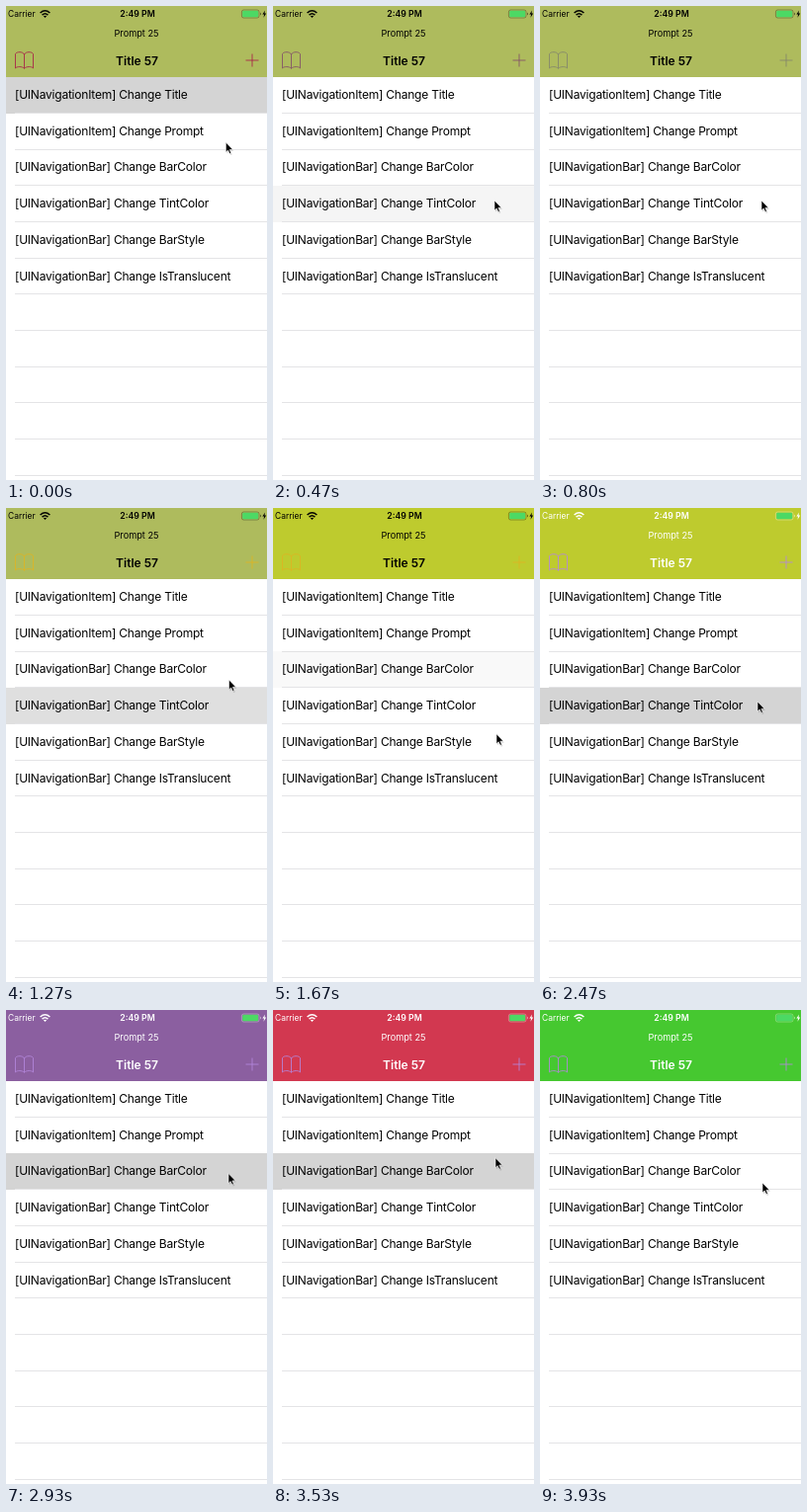
Write an HTML page that moves like this. It is 264x480 px and loops after 3.99 s.

```html
<!DOCTYPE html>
<html lang="en">
<head>
<meta charset="utf-8">
<title>Navigation bar demo</title>
<style>
  html, body { margin: 0; width: 100%; height: 100%; overflow: hidden; background: #fff; }
  svg { display: block; width: 264px; height: 480px; font-family: Inter, Roboto, sans-serif; }
  .row { font-size: 12px; letter-spacing: -.22px; }
  .mid { text-anchor: middle; }
  .bold { font-weight: 600; }
</style>
</head>
<body>
<svg viewBox="0 0 264 480">
  <g id="rows"></g>
  <rect id="bar" width="264" height="72"/>
  <g id="status" font-size="8.45">
    <text x="2" y="11">Carrier</text>
    <text class="mid bold" x="133" y="11" font-size="8.7">2:49 PM</text>
    <path d="M34.6 7Q39.5 2.6 44.4 7M36.6 9.1Q39.5 6.5 42.4 9.1" fill="none" stroke="currentColor" stroke-width="1.5"/>
    <path d="M37.9 10.3Q39.5 9 41.1 10.3L39.5 12Z"/>
    <rect x="238.4" y="4" width="17.6" height="8" rx="2" fill="none" stroke="currentColor" stroke-width=".6" opacity=".5"/>
    <rect x="239.2" y="4.8" width="16" height="6.4" rx="1.3" fill="#4cd964"/>
    <path d="M257 6.5q1.3 1.5 0 3zM262 4.5l-2.6 4h1.7l-.6 3.2 2.7-4.2h-1.7z"/>
  </g>
  <g id="titles">
    <text class="mid" x="132" y="31" font-size="9.2">Prompt 25</text>
    <text class="mid bold" x="132.5" y="60" font-size="12">Title 57</text>
  </g>
  <path id="icons" fill="none" stroke-width=".85" d="M18.5 49C17 46 11 46 9.5 48.5V63C11 61 16.5 61 18.5 63.3C20.5 61 26 61 27.5 63V48.5C26 46 20 46 18.5 49V63.3M242.5 55H255.5M249 48.5V61.5"/>
  <g id="cursor">
    <path d="M1 1.5V11.5L3.2 9.5 4.8 13 6.4 12.3 4.9 8.9 8 8.7Z" opacity=".15"/>
    <path d="M0 0V10L2.2 8 3.8 11.5 5.4 10.8 3.9 7.4 7 7.2Z" stroke="#fff" stroke-width=".6"/>
  </g>
</svg>
<script>
const LOOP = 3990, PITCH = 36.7, TOP = 72;
const BAR = 2, TINT = 3, STYLE = 4; // rows with a visible effect
const $ = id => document.getElementById(id);
const clamp = v => Math.max(0, Math.min(1, v));

const labels = ['Item] Change Title', 'Item] Change Prompt', 'Bar] Change BarColor',
  'Bar] Change TintColor', 'Bar] Change BarStyle', 'Bar] Change IsTranslucent'];

// Each tap highlights the row under it; a colour goes to what that row controls.
const taps = [
  { at: -130, x: 221, y: 90 },
  { at: 240, x: 224, y: 196, colour: '#82506a' },
  { at: 540, x: 224, y: 197, colour: '#84866c' },
  { at: 1020, x: 224, y: 197, colour: '#84866c' },
  { at: 1090, x: 224, y: 197, colour: '#deb423' },
  { at: 1430, x: 226, y: 166, colour: '#becb2e' },
  { at: 1850, x: 226, y: 231, colour: '#fff' },
  { at: 2400, x: 220, y: 196, colour: '#b487dc' },
  { at: 2860, x: 225, y: 166, colour: '#8b5fa0' },
  { at: 3460, x: 225, y: 149, colour: '#d23850' },
  { at: 3680, x: 225, y: 175, colour: '#46c830' }
].map(tap => ({ ...tap, row: Math.floor((tap.y - TOP) / PITCH) }));

$('rows').innerHTML = Array.from({ length: 11 }, (_, i) => {
  const y = TOP + i * PITCH, label = labels[i];
  const cell = label ? `<rect class="hit" y="${Math.round(y)}" width="264" height="37" fill="#d4d4d4"/>
    <text class="row" x="9" y="${(y + 22).toFixed(1)}">[UINavigation${label}</text>` : '';
  return cell + `<rect x="9" y="${Math.round(y + 35.8)}" width="255" height="1" fill="#e4e4e6"/>`;
}).join('');
const hits = document.querySelectorAll('.hit');

function lastTap(row, t) {
  return taps.filter(tap => tap.row === row && tap.at <= t).pop();
}

function colourOf(row, t, initial) {
  const tap = lastTap(row, t);
  return tap ? tap.colour : initial;
}

// The pointer rests briefly after a tap, then glides to the next one.
function cursorAt(t) {
  const i = taps.filter(tap => tap.at <= t).length - 1;
  const a = taps[i], b = taps[i + 1] || a;
  const e = Math.sin(clamp((t - a.at - 70) / 200) * Math.PI / 2);
  return [a.x + (b.x - a.x) * e, a.y + (b.y - a.y) * e];
}

function paint(id, colour) {
  $(id).style.fill = $(id).style.color = colour;
}

function draw(t) {
  $('bar').style.fill = colourOf(BAR, t, '#aebb5d');
  $('icons').style.stroke = colourOf(TINT, t, '#a82048');
  paint('titles', colourOf(STYLE, t, '#000'));
  const style = lastTap(STYLE, t);
  const white = style ? Math.round(255 * clamp((t - style.at - 160) / 200)) : 0;
  paint('status', `rgb(${white},${white},${white})`);
  hits.forEach((hit, row) => {
    const tap = lastTap(row, t);
    hit.style.opacity = tap ? clamp((250 - t + tap.at) / 100) : 0;
  });
  $('cursor').setAttribute('transform', `translate(${cursorAt(t)})`);
}

// The screen refreshes 15 times a second.
function tick() {
  const step = Math.floor((performance.now() % LOOP) * .015 + .06);
  draw(step / .015);
  requestAnimationFrame(tick);
}
tick();
</script>
</body>
</html>
```
